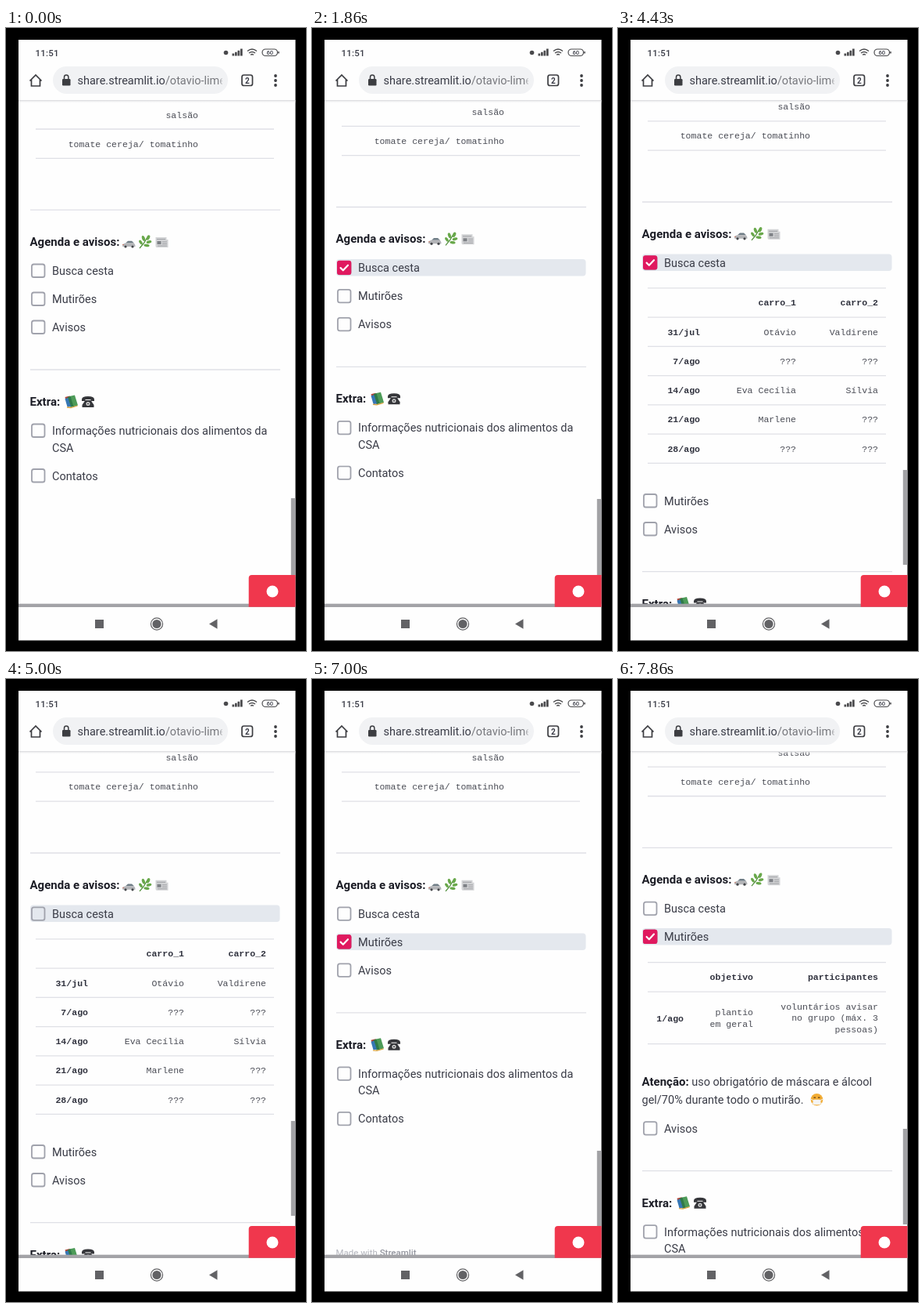
Recreate the animation shown at these times as an HTML page. Size 384x795 px, loop 8000 ms.

```html
<!DOCTYPE html>
<html lang="pt-BR">
<head>
<meta charset="utf-8">
<title>Agenda e avisos</title>
<style>
html, body { margin: 0; width: 100%; height: 100%; overflow: hidden; background: #000; }
svg { display: block; width: 384px; height: 795px; }
text { font: 14.5px Roboto, Arial, sans-serif; fill: #3a3c47; white-space: pre; }
.bold { font-weight: 700; font-size: 15px; fill: #1c1d26; }
.mono text { font: 11.55px "Liberation Mono", "Noto Sans Mono", monospace; fill: #4b4d56; text-anchor: end; }
.mono .th { font-weight: 700; fill: #31333f; }
.rule { stroke: #dfe0e6; stroke-width: 1.3; fill: none; }
.box { fill: none; stroke: #a0a2ac; stroke-width: 1.8; }
.mark { fill: #e0195f; }
.tick { fill: none; stroke: #fff; stroke-width: 2.2; stroke-linecap: round; stroke-linejoin: round; }
.glow { fill: #e4e8ee; }
.foot { font-size: 11.5px; fill: #b3b5bd; }
.foot tspan { font-weight: 500; fill: #9698a1; }

/* every change is a hard cut */
#page, #mut, #rest, #bar, .cut { animation: 8s step-end infinite; }
#page { animation-name: scroll; }
#mut { animation-name: mut; }
#rest { animation-name: rest; }
#bar { animation-name: bar; }
#glowA { animation-name: glow-a; }
#markA { animation-name: mark-a; }
#tableA { animation-name: table-a; }
#markB { animation-name: mark-b; }
#tableB { animation-name: table-b; }
#foot { animation-name: foot; }

@keyframes scroll {
  0% { transform: translateY(0); }
  1.875% { transform: translateY(-3px); }
  5.375% { transform: translateY(-3.7px); }
  28.625% { transform: translateY(-10.2px); }
  98.25%, 100% { transform: translateY(-16.8px); }
}
@keyframes mut {
  0%, 71.5%, 100% { transform: translateY(0); }
  28.625% { transform: translateY(267.7px); }
}
@keyframes rest {
  0%, 71.5% { transform: translateY(0); }
  28.625% { transform: translateY(267.7px); }
  98.25%, 100% { transform: translateY(208.5px); }
}
@keyframes bar {
  0% { y: 600px; height: 100px; }
  1.875% { y: 601px; height: 100px; }
  28.625% { y: 564px; height: 121px; }
  71.5% { y: 602px; height: 98px; }
  98.25%, 100% { y: 574px; height: 122px; }
}
@keyframes glow-a { 0%, 87.5%, 100% { visibility: hidden; } 17.875% { visibility: visible; } }
@keyframes mark-a { 0%, 60.75%, 100% { visibility: hidden; } 17.875% { visibility: visible; } }
@keyframes table-a { 0%, 71.5%, 100% { visibility: hidden; } 28.625% { visibility: visible; } }
@keyframes mark-b { 0% { visibility: hidden; } 87.5%, 100% { visibility: visible; } }
@keyframes table-b { 0% { visibility: hidden; } 98.25%, 100% { visibility: visible; } }
@keyframes foot { 0%, 98.25%, 100% { visibility: hidden; } 71.5% { visibility: visible; } }
</style>
</head>
<body>
<svg viewBox="0 0 384 795">
  <defs>
    <clipPath id="view"><rect x="16" y="93" width="354" height="642"/></clipPath>
    <clipPath id="address"><rect x="88" y="50" width="189" height="34"/></clipPath>
    <linearGradient id="fade">
      <stop offset="0" stop-color="#f1f2f4" stop-opacity="0"/>
      <stop offset="1" stop-color="#f1f2f4"/>
    </linearGradient>
    <linearGradient id="shade" x2="0" y2="1">
      <stop offset="0" stop-color="#d4d5d8"/>
      <stop offset="1" stop-color="#fff" stop-opacity="0"/>
    </linearGradient>
    <rect id="box" class="box" x="33" y="-8" width="16.5" height="16.5" rx="2.6"/>
    <g id="mark">
      <rect class="mark" x="32" y="-9" width="18.3" height="18.3" rx="3"/>
      <path class="tick" d="M36.600 .3l3.200 3.200 6.200-6.600"/>
    </g>
    <rect id="glow" class="glow" x="31" y="-10.800" width="319.500" height="21.600" rx="4"/>
  </defs>

  <rect x="16" y="15" width="354.500" height="766.500" fill="#fefefe"/>

  <g clip-path="url(#view)">
    <g id="page">
      <g class="mono">
        <text x="246" y="114.5">salsão</text>
        <text x="246" y="151.5">tomate cereja/ tomatinho</text>
      </g>
      <path class="rule" d="M38 129h305M38 166.3h305M31 232.2h320"/>

      <text class="bold" x="30.5" y="278">Agenda e avisos:</text>
      <g id="car">
        <path d="M153 274.5l3-2.8h5l3 2.8z" fill="#6f7d86"/>
        <path d="M149 278.5q0-3.5 4-4h10q2.500.5 2.500 4.500h-16z" fill="#b4b5b8"/>
        <circle cx="153" cy="279" r="1.6" fill="#44464a"/>
        <circle cx="162" cy="279" r="1.6" fill="#44464a"/>
        <path d="M149 276.5h2" stroke="#c77a68"/>
      </g>
      <g id="herb" fill="#69a84b">
        <path d="M171 281q6-6 10-14" stroke="#4b8a35" stroke-width="1.2" fill="none"/>
        <ellipse cx="182" cy="267.5" rx="2" ry="3.4" transform="rotate(25 182 267.5)"/>
        <ellipse cx="176" cy="268.5" rx="1.9" ry="3.6" transform="rotate(-20 176 268.5)"/>
        <ellipse cx="183" cy="273" rx="3.4" ry="1.8" transform="rotate(-12 183 273)"/>
        <ellipse cx="172.5" cy="273.5" rx="1.7" ry="3.2" transform="rotate(-35 172.5 273.5)"/>
        <ellipse cx="180" cy="277.5" rx="3.6" ry="1.7" transform="rotate(8 180 277.5)"/>
      </g>
      <g id="news">
        <path d="M191.500 267h14v3h2v10h-14.500q-1.500 0-1.500-2z" fill="#d2d3d5"/>
        <path d="M193 269.5h11M200 273h6M200 275.5h6M194 278h12" stroke="#a0a2a6"/>
        <rect x="193.5" y="272" width="5" height="4" fill="#7e8186"/>
      </g>

      <g transform="translate(0 309.5)">
        <use href="#glow" id="glowA" class="cut"/>
        <use href="#box"/>
        <use href="#mark" id="markA" class="cut"/>
        <text x="59" y="5.5">Busca cesta</text>
      </g>

      <g id="tableA" class="mono cut"></g>

      <g id="mut">
        <g transform="translate(0 345.5)">
          <g id="markB" class="cut"><use href="#glow"/><use href="#mark"/></g>
          <use href="#box"/>
          <use href="#mark" class="cut" style="animation-name:mark-b"/>
          <text x="59" y="5.5">Mutirões</text>
        </g>
      </g>

      <g id="tableB" class="cut">
        <path class="rule" d="M38 378.5h305M38 416h305M38 482.5h305"/>
        <g class="mono">
          <text class="th" x="173" y="401">objetivo</text>
          <text class="th" x="333" y="401">participantes</text>
          <text class="th" x="84" y="453.5">1/ago</text>
          <text x="173" y="446">plantio</text>
          <text x="173" y="460.5">em geral</text>
          <text x="333" y="438.5">voluntários avisar</text>
          <text x="333" y="453">no grupo (máx. 3</text>
          <text x="333" y="467.5">pessoas)</text>
        </g>
        <text x="30.5" y="535.5"><tspan class="bold">Atenção:</tspan> uso obrigatório de máscara e álcool</text>
        <text x="30.5" y="558.5">gel/70% durante todo o mutirão.</text>
        <g id="mask">
          <circle cx="254.5" cy="553.5" r="7.8" fill="#f2ad35"/>
          <path d="M247 553l3 1.500h9l3-1.500M248 558l3 1M261 558l-3 1" stroke="#eee" fill="none"/>
          <rect x="249.5" y="553.5" width="10" height="6.5" rx="2.5" fill="#f4f4f4"/>
          <path d="M250.500 551h2.500M256 551h2.500" stroke="#5d3b17" stroke-width="1.3"/>
        </g>
      </g>

      <g id="rest">
        <g transform="translate(0 381.5)"><use href="#box"/><text x="59" y="5.5">Avisos</text></g>
        <path class="rule" d="M31 436h320"/>
        <text class="bold" x="30.5" y="482">Extra:</text>
        <g id="books">
          <path d="M75.500 471l6-1.500 4 13-6 1z" fill="#b5443a"/>
          <path d="M81 470l7-1.500 4 13-6.500 2z" fill="#4d9b58"/>
          <path d="M78.500 471l4-1 4 13-4 1z" fill="#2f7a48"/>
          <path d="M75.500 473l4-1 3.500 11-4.500.5z" fill="#3677b5"/>
          <path d="M78 484l5 .5 8.500-2.500" stroke="#d9a544" stroke-width="1.3" fill="none"/>
        </g>
        <g id="phone" fill="#35363a">
          <path d="M97 474q0-4 8-4t8 4v2h-4.500v-2h-7v2H97z"/>
          <path d="M101.500 475h7l4 6v3h-15v-3z"/>
          <circle cx="105" cy="479.5" r="2.5" fill="#d5d5d5"/>
          <circle cx="105" cy="479.5" r="1"/>
        </g>
        <g transform="translate(0 513.5)">
          <use href="#box"/>
          <text x="59" y="5.5">Informações nutricionais dos alimentos da</text>
          <text x="59" y="27">CSA</text>
        </g>
        <g transform="translate(0 571)"><use href="#box"/><text x="59" y="5.5">Contatos</text></g>
        <text id="foot" class="foot cut" x="30.5" y="746">Made with <tspan>Streamlit</tspan></text>
      </g>
    </g>
  </g>

  <rect id="bar" x="364.8" y="600" width="5.7" height="100" fill="#a2a2a5"/>
  <rect x="16" y="734.7" width="354.5" height="4.3" fill="#a3a3a7"/>
  <path d="M310.700 738.700v-36.700q0-4 4-4h55.800v40.700z" fill="#f0374d"/>
  <circle cx="341" cy="719" r="7.5" fill="#fff"/>

  <g id="status" fill="#4a4a4d">
    <text x="37.5" y="35.5" style="font-size:11.5px;font-weight:500;letter-spacing:.2px">11:51</text>
    <circle cx="281.5" cy="31.5" r="2.8"/>
    <path d="M289.500 32.500h2.700v3h-2.700zM293 30.800h2.700v4.700h-2.700zM296.500 28.800h2.700v6.700h-2.700zM300 26.500h2.700v9h-2.700z"/>
    <g fill="none" stroke="#4a4a4d" stroke-width="1.5">
      <path d="M309 29.500q6-5 12 0M311 32q4-3 8 0M313.200 34.300q1.800-1.400 3.600 0"/>
      <rect x="328" y="27" width="19.5" height="8.5" rx="4.2" stroke-width="1.2"/>
      <path d="M349 30v2.500"/>
    </g>
    <text x="337.7" y="34" text-anchor="middle" style="font-size:7.5px;font-weight:500">60</text>
  </g>

  <g id="toolbar">
    <rect x="16" y="92" width="354.5" height="4" fill="url(#shade)"/>
    <path d="M30.500 67.500l7.500-7.500 7.500 7.500M32.500 66v8h11v-8" fill="none" stroke="#3c3d41" stroke-width="1.7"/>
    <rect x="60" y="49" width="224" height="35" rx="17.5" fill="#f1f2f4"/>
    <rect x="72" y="65" width="10.5" height="8.5" rx="1.2" fill="#3c3d41"/>
    <path d="M74.500 65v-2.300a2.700 2.700 0 0 1 5.400 0V65" fill="none" stroke="#3c3d41" stroke-width="1.5"/>
    <g clip-path="url(#address)">
      <text x="91.5" y="72">share.streamlit.io<tspan fill="#77787d">/otavio-limeira</tspan></text>
      <rect x="271" y="54" width="8" height="26" fill="url(#fade)"/>
    </g>
    <rect x="302" y="60" width="13.5" height="13.5" rx="2.5" fill="none" stroke="#3c3d41" stroke-width="1.7"/>
    <text x="308.8" y="70.5" text-anchor="middle" style="font-size:10px;font-weight:700">2</text>
    <g fill="#3c3d41">
      <circle cx="345" cy="61" r="1.9"/><circle cx="345" cy="67" r="1.9"/><circle cx="345" cy="73" r="1.9"/>
    </g>
  </g>

  <g id="nav" fill="#626265">
    <rect x="114" y="755" width="11" height="11"/>
    <circle cx="193" cy="760.5" r="5.6"/>
    <circle cx="193" cy="760.5" r="7.6" fill="none" stroke="#626265" stroke-width="1.2"/>
    <path d="M260 760.500l10.500-6.300v12.600z"/>
  </g>
</svg>
<script>
const rows = [
  ["", "carro_1", "carro_2"],
  ["31/jul", "Otávio", "Valdirene"],
  ["7/ago", "???", "???"],
  ["14/ago", "Eva Cecília", "Sílvia"],
  ["21/ago", "Marlene", "???"],
  ["28/ago", "???", "???"]
];
const ends = [105, 228, 333], top0 = 342, pitch = 37.25;
const rule = i => `<path class="rule" d="M38 ${top0 + i * pitch}h305"/>`;
const cell = (s, r, c) =>
  `<text class="${r && c ? "" : "th"}" x="${ends[c]}" y="${top0 + r * pitch + 22.5}">${s}</text>`;
document.getElementById("tableA").innerHTML =
  rows.map((row, r) => rule(r) + row.map((s, c) => cell(s, r, c)).join("")).join("") + rule(rows.length);
</script>
</body>
</html>
```
